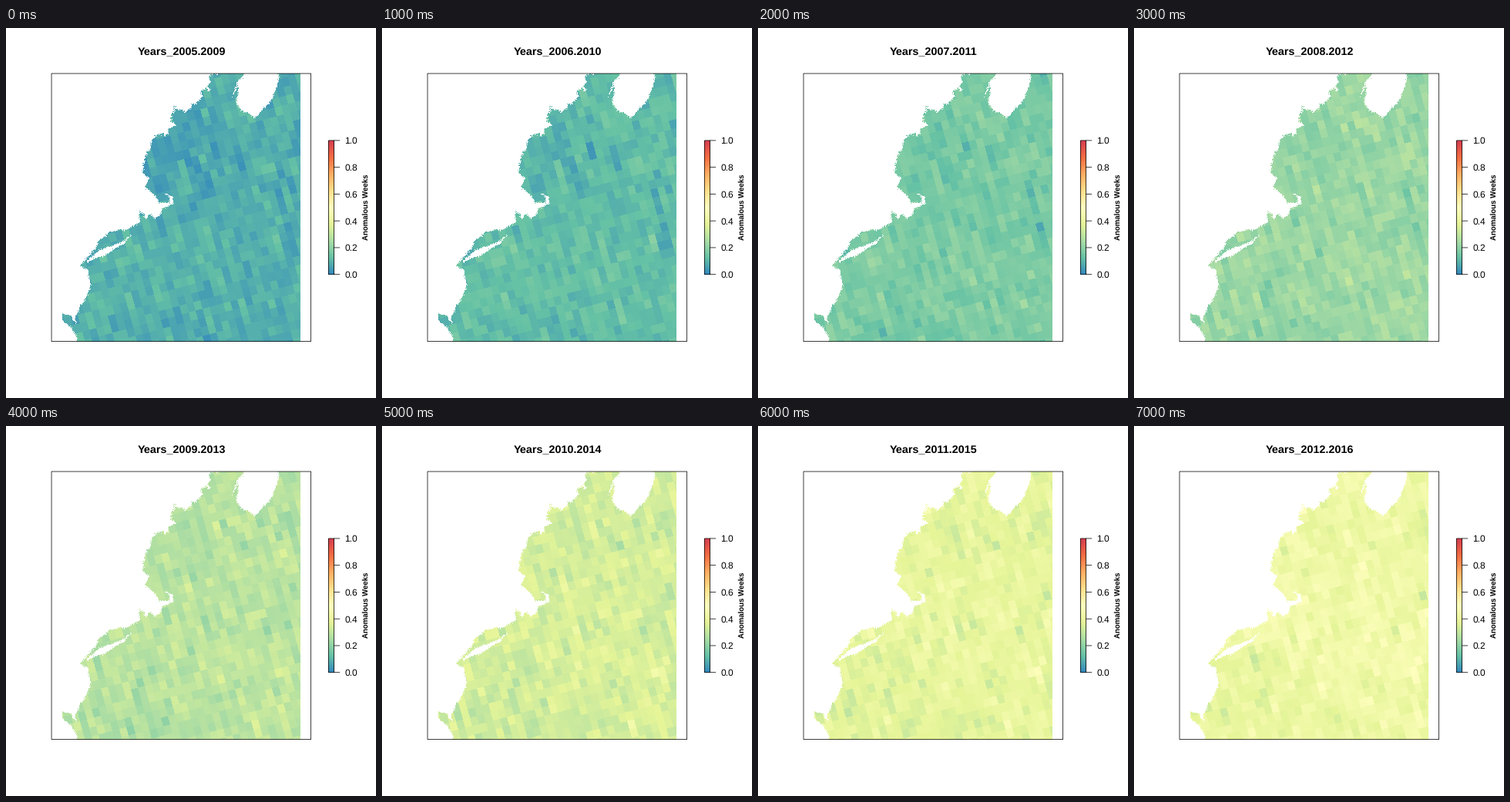
Write a matplotlib script that moves like this. It is 480 by 480 pixels and loops after 8000 ms.

```python
import numpy as np
import matplotlib.pyplot as plt
from matplotlib.animation import FuncAnimation
from matplotlib.colors import LinearSegmentedColormap
from matplotlib.patches import Rectangle
from matplotlib.path import Path

SIZE = 480
FIRST_YEAR = 2005
WINDOWS = 8
SPAN = 5
plt.rcParams["font.family"] = "Liberation Sans"
plt.rcParams["text.hinting"] = "none"

PALETTE = LinearSegmentedColormap.from_list("weeks", [
    "#3288BD", "#66C2A5", "#ABDDA4", "#E6F598", "#FFFFBF",
    "#FEE08B", "#FDAE61", "#F46D43", "#D53E4F"], N=512)

# Key points of the shores; roughen() adds the small detail
MAINE = [(271, 50), (267, 68), (268, 80), (252, 92), (241, 102), (230, 108),
         (218, 100), (219, 124), (204, 136), (190, 144)]
CAPE = [(190, 144), (187, 158), (180, 175), (179, 190), (186, 194),
        (180, 207), (190, 214), (198, 227), (212, 228), (213, 219),
        (204, 213), (216, 219), (217, 228), (203, 234), (193, 247),
        (187, 241), (182, 249), (173, 237), (174, 250)]
SOUTH = [(174, 250), (158, 261), (122, 274), (106, 297), (96, 309),
         (106, 313), (108, 340), (91, 384), (84, 373), (72, 370),
         (73, 379), (89, 394), (91, 410)]
PENINSULA = [(311, 50), (301, 79), (299, 92), (304, 107), (314, 110),
             (322, 117), (330, 109), (345, 92), (354, 66), (355, 50)]
LONG_ISLAND = [(103, 305), (118, 290), (142, 281), (163, 268), (153, 280),
               (130, 294), (103, 305)]
SLIVER = [(293, 91), (301, 69), (310, 59), (293, 91)]

rng = np.random.default_rng(11)
Y, X = np.mgrid[0:SIZE, 0:SIZE] + .5

# The data grid is tilted: one step along a row, one step down a column
STEPS = np.array([[9.0, 3.0], [-2.4, 11.0]])
ANCHOR = np.array([234, 305])
GRID = 100
HALF = GRID // 2


def roughen(points, amount, rounds=3):
    # Midpoint displacement: each round shifts new midpoints sideways
    points = np.array(points, float)
    for _ in range(rounds):
        step = np.diff(points, axis=0)
        side = np.column_stack([-step[:, 1], step[:, 0]])
        shift = rng.normal(0, amount, (len(step), 1))
        middle = points[:-1] + step / 2 + side * shift
        mixed = np.empty((2 * len(points) - 1, 2))
        mixed[::2], mixed[1::2] = points, middle
        points = mixed
    return points


def sea_mask():
    mainland = np.vstack([roughen(MAINE, .32, 4), roughen(CAPE, .10),
                          roughen(SOUTH, .06), [(40, 410), (40, 50)]])
    outlines = [mainland, roughen(PENINSULA, .06),
                roughen(LONG_ISLAND, .04), np.array(SLIVER)]
    pixels = np.column_stack([X.ravel(), Y.ravel()])
    pixels = pixels + rng.normal(0, .7, pixels.shape)
    land = np.zeros(X.size, bool)
    for outline in outlines:
        land |= Path(outline).contains_points(pixels)
    inside = (X > 73) & (X < 382) & (Y > 59) & (Y < 407)
    return inside & ~land.reshape(X.shape)


def yearly_noise():
    noise = rng.normal(size=(WINDOWS + SPAN - 1, GRID, GRID))
    streaky = noise + .55 * np.roll(noise, 1, axis=1)
    return streaky / streaky.std()


def pixel_cells():
    to_grid = np.linalg.inv(STEPS)
    offset = np.stack([X - ANCHOR[0], Y - ANCHOR[1]])
    index = np.floor(np.tensordot(to_grid, offset, 1) + .5).astype(int)
    col, row = np.clip(index + HALF, 0, GRID - 1)
    return row, col


def cell_centres():
    row, col = np.mgrid[0:GRID, 0:GRID] - HALF
    return np.tensordot(STEPS, np.stack([col, row]), 1) \
        + ANCHOR[:, None, None]


SEA = sea_mask()
NOISE = yearly_noise()
ROW, COL = pixel_cells()
CX, CY = cell_centres()


def bump(x, y, radius):
    return np.exp(-((CX - x) ** 2 + (CY - y) ** 2) / (2 * radius ** 2))


def cell_values(k):
    t = k / (WINDOWS - 1)
    ease = .5 * t + .5 * t * t * (3 - 2 * t)
    # Five-year windows share years, so the cells change gradually
    moving = NOISE[k:k + SPAN].sum(axis=0) / np.sqrt(SPAN)
    values = .08 + .34 * ease + (.022 + .008 * t) * moving
    values += (.05 * t - .025) * bump(205, 170, 30)
    values += (.015 - .045 * t) * bump(140, 355, 45)
    values += .02 * bump(270, 300, 40)
    return np.clip(values, 0, 1)


def map_image(k):
    image = PALETTE(cell_values(k)[ROW, COL])
    image[..., 3] = SEA
    return image


fig = plt.figure(figsize=(SIZE / 72, SIZE / 72), dpi=72, facecolor="white")
ax = fig.add_axes([0, 0, 1, 1])
ax.axis("off")


def show(image, left, right, top, bottom):
    return ax.imshow(image, extent=(left, right, bottom, top), cmap=PALETTE,
                     interpolation="nearest", aspect="auto", zorder=1)


def outline(left, right, top, bottom):
    ax.add_patch(Rectangle((left, top), right - left, bottom - top,
                           fill=False, ec="black", lw=.75, snap=False,
                           zorder=3))


LEFT, RIGHT, TOP, BOTTOM = 59.04, 395.6, 59.04, 406.56
BAR = (418.5, 425.5)
BAR_TOP, BAR_BOTTOM = 145.92, 319.68

sea = show(map_image(0), 0, SIZE, 0, SIZE)
show(np.linspace(1, 0, 174)[:, None], 418, 426, 146, 320)
ax.set_xlim(0, SIZE)
ax.set_ylim(SIZE, 0)

outline(LEFT, RIGHT, TOP, BOTTOM)
outline(*BAR, BAR_TOP, BAR_BOTTOM)
for value in np.linspace(0, 1, 6):
    y = BAR_BOTTOM + (BAR_TOP - BAR_BOTTOM) * value
    ax.plot([BAR[1], 432.7], [y, y], color="black", lw=.75, snap=False,
            zorder=3)
    ax.text(439.3, y + 4.2, f"{value:.1f}", fontsize=12, va="baseline")

ax.text(472, 232.3, "Anomalous Weeks", fontsize=9.6, weight="bold",
        rotation=90, ha="right", va="center", rotation_mode="default")
title = ax.text((LEFT + RIGHT) / 2 + .3, 35, "", fontsize=14.4,
                weight="bold", ha="center", va="baseline")


def update(k):
    year = FIRST_YEAR + k
    title.set_text(f"Years_{year}.{year + SPAN - 1}")
    sea.set_data(map_image(k))
    return sea, title


anim = FuncAnimation(fig, update, frames=WINDOWS, interval=1000,
                     repeat=True, repeat_delay=0, blit=False)
plt.show()
```
